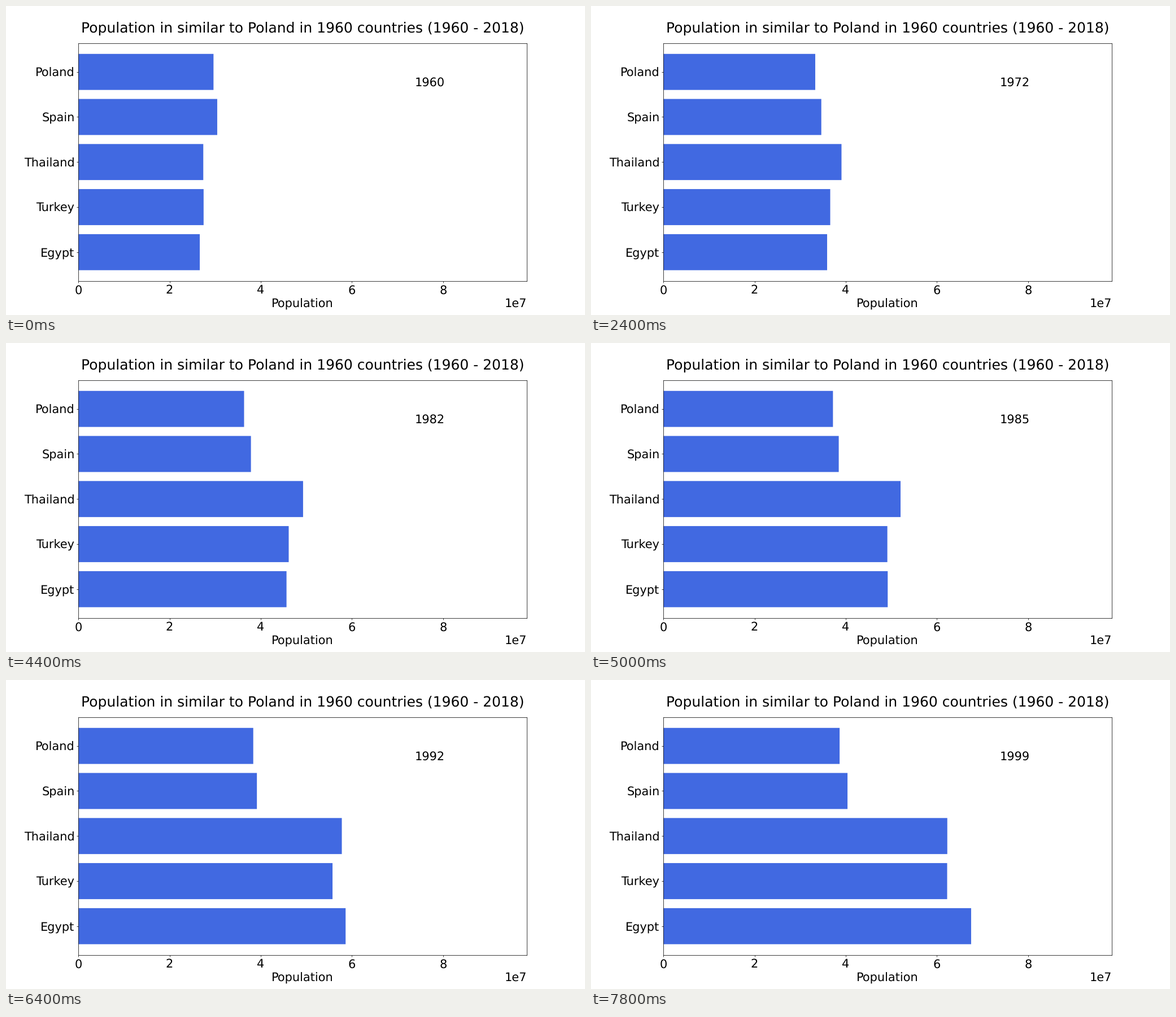
Recreate the animation shown at these times as a matplotlib script. Size 1025x547 px, loop 8000 ms.

```python
import numpy as np
import matplotlib.pyplot as plt
from matplotlib.animation import FuncAnimation

W, H = 1025, 547
DPI = W / 15
FIRST_YEAR, FRAMES, INTERVAL = 1960, 40, 200
X_MAX = 98.42e6

plt.rcParams.update({
    "font.family": "DejaVu Sans",
    "font.size": 22,
    "text.hinting": "none",
    "toolbar": "None",
})

# A few key points per bar, in millions; smooth growth in between
KEY_YEARS = np.array([1960, 1967, 1976, 1985, 1992, 1999])
POPULATION = {
    "Egypt": [26.63, 32.02, 39.39, 49.21, 58.62, 67.51],
    "Turkey": [27.47, 32.48, 40.19, 49.13, 55.75, 62.25],
    "Thailand": [27.40, 33.73, 43.39, 52.03, 57.79, 62.28],
    "Spain": [30.46, 32.68, 36.14, 38.47, 39.16, 40.39],
    "Poland": [29.64, 31.99, 34.36, 37.20, 38.36, 38.66],
}


def smooth(year, points):
    """Cubic Hermite curve through the key points."""
    points = np.array(points)
    slopes = np.gradient(points, KEY_YEARS)
    i = np.clip(np.searchsorted(KEY_YEARS, year, side="right") - 1,
                0, len(KEY_YEARS) - 2)
    span = KEY_YEARS[i + 1] - KEY_YEARS[i]
    t = (year - KEY_YEARS[i]) / span
    ease = t * t * (3 - 2 * t)
    bend = t * (1 - t) * ((1 - t) * slopes[i] - t * slopes[i + 1])
    return points[i] + ease * (points[i + 1] - points[i]) + span * bend


# The tiny surplus keeps the pixel size from rounding down
fig = plt.figure(figsize=((W + 0.001) / DPI, (H + 0.001) / DPI), dpi=DPI)
fig.subplots_adjust(right=0.8999)
ax = fig.add_subplot()
bars = ax.barh(list(POPULATION), [p[0] * 1e6 for p in POPULATION.values()],
               color="royalblue", snap=False)
ax.set_xlim(0, X_MAX)
ax.set_ylim(-0.64, 4.64)
ax.set_xticks(np.arange(0, 9e7, 2e7))
ax.set_xlabel("Population")
ax.set_title("Population in similar to Poland in 1960 countries (1960 - 2018)", pad=20)
year_text = ax.text(0.75, 0.8186, str(FIRST_YEAR), transform=ax.transAxes)


def update(frame):
    year = FIRST_YEAR + frame
    for bar, points in zip(bars, POPULATION.values()):
        bar.set_width(smooth(year, points) * 1e6)
    year_text.set_text(str(year))
    return [*bars, year_text]


anim = FuncAnimation(fig, update, frames=FRAMES, interval=INTERVAL,
                     repeat=True, repeat_delay=0, blit=False)
plt.show()
```
